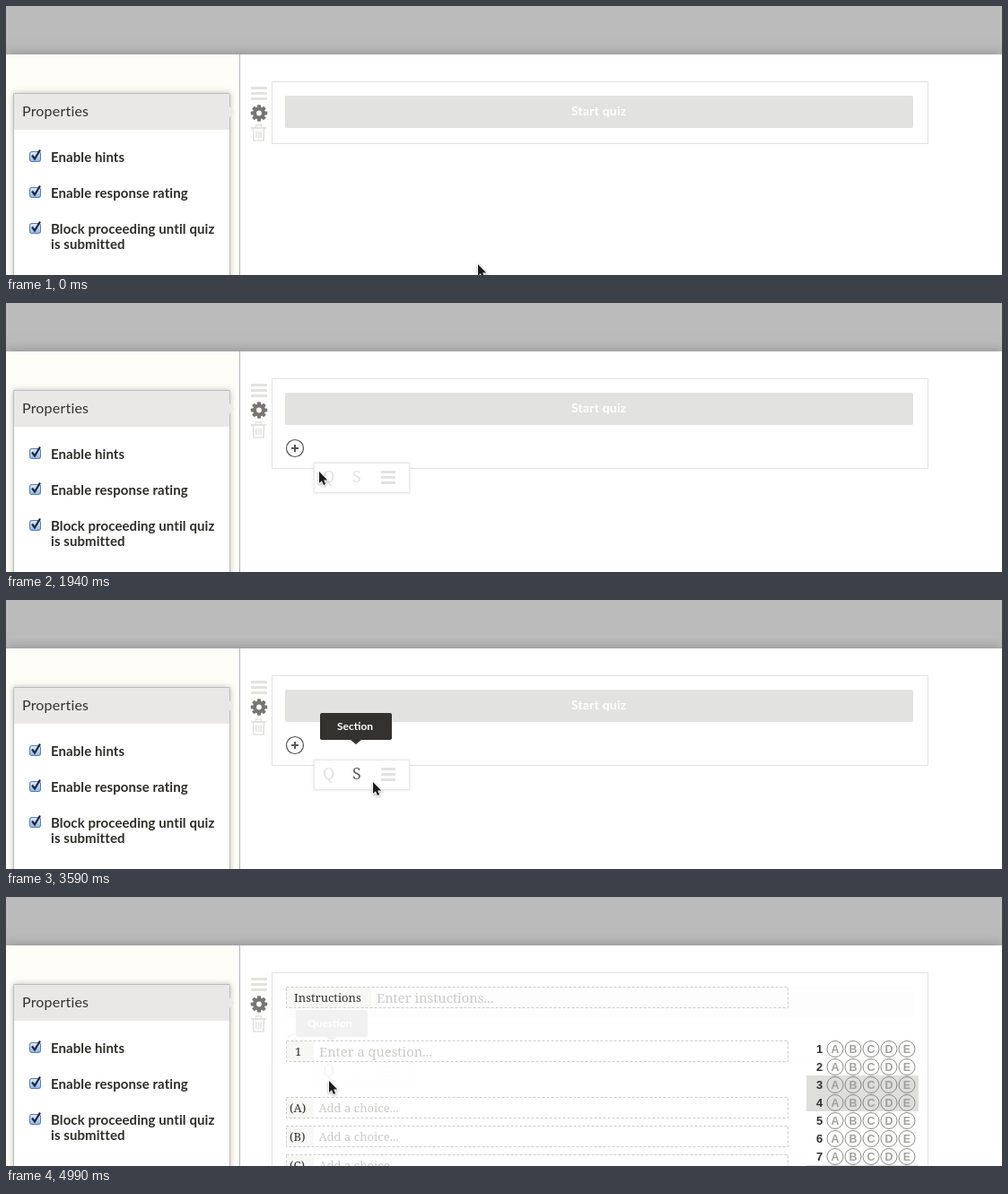
Recreate the animation shown at these times as an HTML page with a canvas. Size 1110x300 px, loop 8520 ms.

```html
<!DOCTYPE html>
<html lang="en">
<head>
<meta charset="utf-8">
<title>Quiz builder</title>
<style>
html, body { margin: 0; width: 100%; height: 100%; overflow: hidden; background: #fff; }
canvas { display: block; }
</style>
</head>
<body>
<canvas id="stage" width="1110" height="300"></canvas>
<script>
const ctx = document.getElementById('stage').getContext('2d');
const LOOP = 8520, STEP = 30;
const SANS = 'Lato, sans-serif', SERIF = '"Noto Serif", serif', ARIAL = '"Liberation Sans", sans-serif';
const PALE = '#e2e2e0';

// Pointer path: time, x, y
const PATH = [
  [0, 526, 288], [870, 333.5, 157], [1100, 333.5, 157], [1460, 337, 168],
  [1970, 350, 190], [2390, 362, 203], [3050, 381, 203], [3860, 425, 203],
  [4070, 396, 204], [4340, 360, 205]
];

// Menu items: hover spans as [start, end] pairs
const ITEMS = [
  { label: 'Question', x: 363, textX: 336, spans: [[2060, 2780], [4250, 9000]] },
  { label: 'Section', x: 390, textX: 369, spans: [[3170, 3640]] },
  { label: 'Passage', x: 426, textX: 403, spans: [[3710, 4150]] }
];

const clamp = v => Math.max(0, Math.min(1, v));
const ramp = (t, start, span) => clamp((t - start) / span);
const mix = (a, b, k) => a + (b - a) * k;

function hover(t, item) {
  return Math.max(...item.spans.map(([a, b]) => Math.min(ramp(t, a, 90), 1 - ramp(t, b, 60))));
}

function grey(from, to, k) {
  const v = Math.round(mix(from, to, k));
  return `rgb(${v},${v},${v})`;
}

function box(x, y, w, h, color, r = 0) {
  ctx.fillStyle = color;
  ctx.beginPath();
  ctx.roundRect(x, y, w, h, r);
  ctx.fill();
}

function frame(x, y, w, h, color, dash = []) {
  ctx.strokeStyle = color;
  ctx.lineWidth = 1;
  ctx.setLineDash(dash);
  ctx.strokeRect(x + 0.5, y + 0.5, w - 1, h - 1);
  ctx.setLineDash([]);
}

function write(s, x, y, font, color, spacing = 0, align = 'left') {
  ctx.font = font;
  ctx.fillStyle = color;
  ctx.textAlign = align;
  ctx.letterSpacing = spacing + 'px';
  ctx.fillText(s, x, y);
}

function shape(points, color) {
  ctx.fillStyle = color;
  ctx.beginPath();
  points.forEach(([x, y]) => ctx.lineTo(x, y));
  ctx.closePath();
  ctx.fill();
}

function line(points, color, width) {
  ctx.strokeStyle = color;
  ctx.lineWidth = width;
  ctx.beginPath();
  points.forEach(([x, y]) => ctx.lineTo(x, y));
  ctx.stroke();
}

function ring(x, y, r, color, width) {
  ctx.strokeStyle = color;
  ctx.lineWidth = width;
  ctx.beginPath();
  ctx.arc(x, y, r, 0, Math.PI * 2);
  ctx.stroke();
}

function bars(x, y, w, color) {
  for (let i = 0; i < 3; i++) box(x, y + i * 6, w, 3, color);
}

function shadowed(blur, alpha, draw) {
  ctx.save();
  ctx.shadowColor = `rgba(0,0,0,${alpha})`;
  ctx.shadowBlur = blur;
  draw();
  ctx.restore();
}

function checkbox(y) {
  const g = ctx.createLinearGradient(0, y, 0, y + 12);
  g.addColorStop(0, '#e4effb');
  g.addColorStop(1, '#8bb6e6');
  box(26, y, 13, 12, '#5d7ba6', 3);
  box(27, y + 1, 11, 10, g, 2);
  line([[29, y + 4.5], [32, y + 8.5], [38, y - 1.5]], '#1d2740', 2.2);
}

function gear(x, y) {
  ctx.save();
  ctx.translate(x, y);
  for (let i = 0; i < 8; i++) {
    box(-2, -9.2, 4, 5, '#777672', 0.8);
    ctx.rotate(Math.PI / 4);
  }
  ring(0, 0, 4.9, '#777672', 4);
  ctx.restore();
}

function trash(x, y) {
  line([[x, y + 4], [x + 17, y + 4]], PALE, 2);
  line([[x + 5.5, y + 3], [x + 5.5, y + 0.8], [x + 11.5, y + 0.8], [x + 11.5, y + 3]], PALE, 1.5);
  line([[x + 2.5, y + 5], [x + 3, y + 18], [x + 14, y + 18], [x + 14.5, y + 5]], PALE, 1.7);
  for (const dx of [5.8, 8.5, 11.2]) line([[x + dx, y + 7.5], [x + dx, y + 15.5]], PALE, 1.5);
}

function page() {
  box(0, 0, 1110, 300, '#bbb');
  shadowed(13, 0.28, () => box(0, 54, 1110, 300, '#fff'));
  box(0, 54, 260, 246, '#fffdf8');
  box(260, 54, 1, 246, '#b5b5b3');

  shadowed(6, 0.25, () => box(8, 97, 242, 240, '#bdbdbb', 2));
  box(9, 98, 240, 210, '#fff');
  box(9, 98, 240, 40, '#e9e8e6');
  shape([[249, 112], [255, 118], [249, 124]], '#ecebe9');
  write('Properties', 18, 123, '16px ' + SANS, '#33322e', 0.2);
  const bold = 'bold 15px ' + SANS;
  [[174, 'Enable hints'], [214, 'Enable response rating'],
   [254, 'Block proceeding until quiz'], [271, 'is submitted']]
    .forEach(([y, s]) => write(s, 50, y, bold, '#2d2c29', 0.08));
  [162, 202, 242].forEach(checkbox);

  bars(273, 90, 18, PALE);
  gear(282, 119.5);
  trash(273, 132);
}

function menu(t) {
  ctx.globalAlpha = ramp(t, 1130, 90);
  shadowed(3, 0.12, () => box(343, 178, 107, 34, '#e9e9e8', 1));
  box(344, 179, 105, 32, '#fff');
  const tone = ITEMS.map(item => grey(225, 95, hover(t, item)));
  write('Q', 353, 200, '18px ' + SERIF, tone[0]);
  write('S', 386, 200, '18px ' + SERIF, tone[1]);
  bars(418, 187, 16, tone[2]);
  ctx.globalAlpha = 1;
}

function tooltip(item, alpha) {
  if (!alpha) return;
  ctx.globalAlpha = alpha;
  box(item.x - 40, 126, 80, 30, '#33322e', 2);
  shape([[item.x - 6, 156], [item.x + 6, 156], [item.x, 161]], '#33322e');
  write(item.label, item.textX, 145, 'bold 12px ' + SANS, '#fff');
  ctx.globalAlpha = 1;
}

function starter(t) {
  const grow = ramp(t, 870, 90);
  frame(296, 84, 732, mix(70, 101, grow), PALE);
  box(311, 100, 700, 36, PALE, 2);
  write('Start quiz', 630, 122, 'bold 14px ' + SANS, '#fff', 0.2);
  if (grow) {
    const tone = grey(226, 85, ramp(t, 1100, 90));
    ctx.globalAlpha = grow;
    ring(322, 162, 9.5, tone, 1.2);
    box(318, 161, 8, 2, tone);
    box(321, 158, 2, 8, tone);
    ctx.globalAlpha = 1;
  }
  if (t >= 1130) menu(t);
  ITEMS.forEach(item => tooltip(item, hover(t, item)));
}

function field(y, labelW, label, labelX, hint, hintX, size) {
  box(313, y + 1, labelW, 22, '#f7f7f6');
  frame(312, y, 560, 24, '#c9c9c7', [3, 2]);
  write(label, labelX, y + 17, '13px ' + SERIF, '#222');
  write(hint, hintX, y + (size > 14 ? 18 : 17), size + 'px ' + SERIF, '#c6c6c4');
}

function answers() {
  box(892, 199, 125, 40, '#dcdcdb');
  box(892, 299, 125, 1, '#dcdcdb');
  for (let row = 0; row < 8; row++) {
    const y = 169 + row * 20;
    write(String(row + 1), 906.5, y + 5, 'bold 13px ' + ARIAL, '#222', 0, 'center');
    [...'ABCDE'].forEach((letter, i) => {
      const x = 924 + i * 20;
      ring(x, y + 0.5, 9, '#83827f', 1);
      write(letter, x, y + 5, 'bold 12.5px ' + ARIAL, '#9a9a98', 0, 'center');
    });
  }
}

function editor(alpha) {
  ctx.globalAlpha = alpha;
  box(297, 85, 730, 215, '#fff');
  frame(296, 84, 732, 230, PALE);
  field(100, 94, 'Instructions', 321, 'Enter instuctions...', 413, 14.7);
  field(160, 30, '1', 322, 'Enter a question...', 349, 14.7);
  [...'ABC'].forEach((letter, i) =>
    field(223 + i * 32, 30, `(${letter})`, 316, 'Add a choice...', 348.5, 13.1));
  answers();
  ctx.globalAlpha = 1;
}

function pointer(t) {
  let i = 1;
  while (i < PATH.length - 1 && PATH[i][0] < t) i++;
  const [t0, x0, y0] = PATH[i - 1], [t1, x1, y1] = PATH[i];
  const k = ramp(t, t0, t1 - t0);
  ctx.save();
  ctx.translate(Math.round(mix(x0, x1, k)), Math.round(mix(y0, y1, k)));
  const arrow = [[0, 0], [0, 13], [2.9, 10.3], [5, 15], [7.2, 14], [5.2, 9.5], [9.3, 9.5]];
  ctx.lineJoin = 'round';
  shadowed(3, 0.35, () => {
    ctx.shadowOffsetY = 1;
    line([...arrow, [0, 0]], '#fff', 1.8);
  });
  shape(arrow, '#1c1c1c');
  ctx.restore();
}

function draw(t) {
  page();
  const swap = ramp(t, 4840, 150);
  if (swap < 1) starter(t);
  if (swap > 0) editor(swap);
  pointer(t);
}

const start = performance.now();
function tick() {
  const t = (performance.now() - start) % LOOP;
  draw(Math.floor(t / STEP) * STEP);
  requestAnimationFrame(tick);
}
tick();
</script>
</body>
</html>
```
